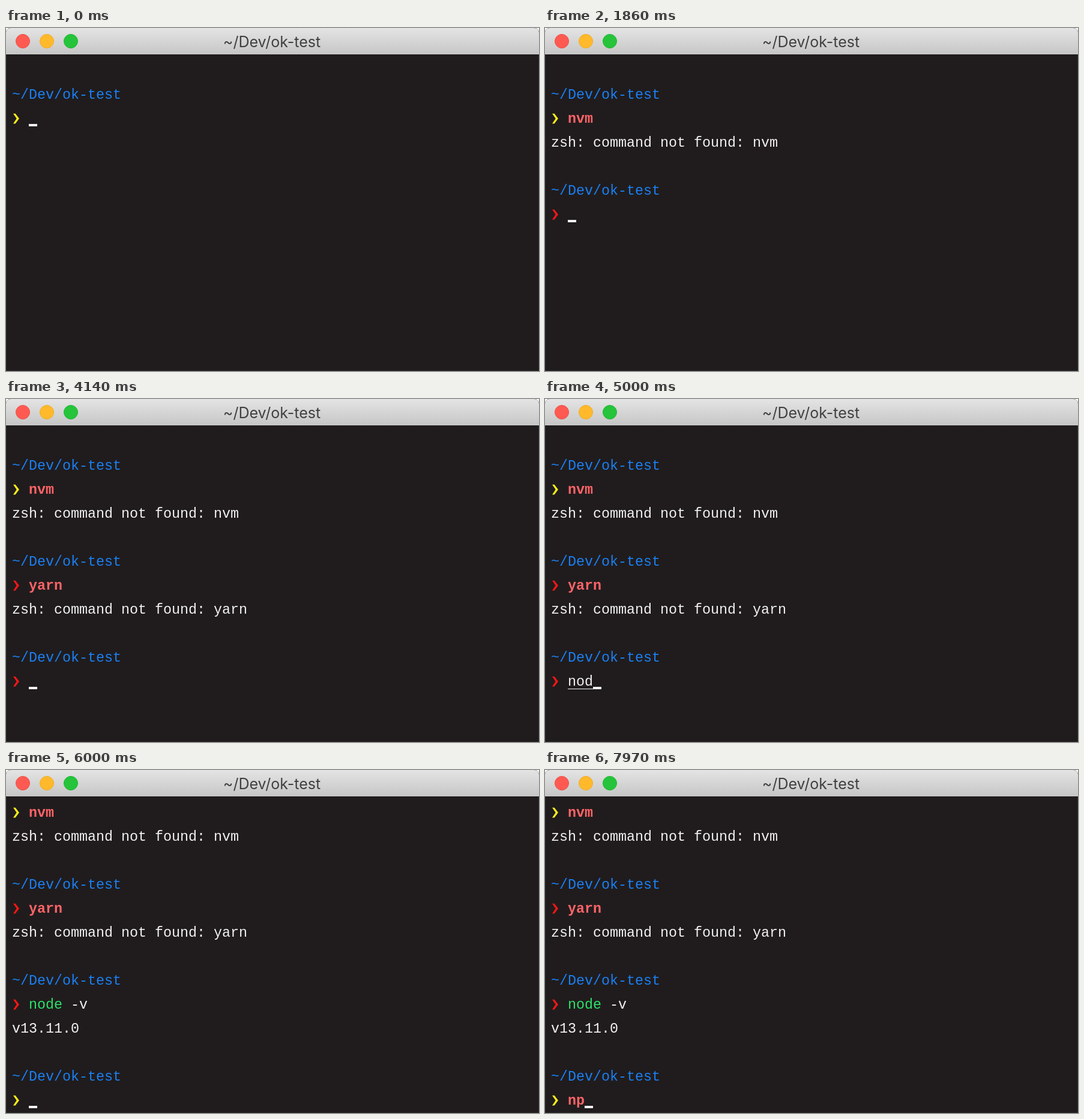
These frames come from a looping animation (888x572 px, 8 s). An HTML page with a canvas:

```html
<!DOCTYPE html>
<html lang="en">
<head>
<meta charset="utf-8">
<title>Terminal</title>
<style>
  html, body { margin: 0; width: 100%; height: 100%; overflow: hidden; background: #fff; }
  canvas { display: block; width: 888px; height: 572px; }
</style>
</head>
<body>
<canvas id="stage" width="888" height="572"></canvas>
<script>
const W = 888, H = 572, LOOP = 8000;
const CELL = 14, LINE = 40, LEFT = 10, FIRST_BASE = 78, MAX_ROWS = 13;
const MONO = '23.33px "Liberation Mono", monospace';
const COLOR = {
  bg: '#201c1d', text: '#f2f2f2', path: '#1a80f5', bad: '#ff6468',
  good: '#2be36a', ok: '#fff01a', fail: '#ff1616'
};
const FILES = ['node_modules', 'yarn.lock'];
const DIR = '~/Dev/ok-test';

// Each command: keystroke times, return key and end of output, in ms.
const SESSION = [
  { cmd: 'nvm', keys: [1180, 1320, 1450], enter: 1730, done: 1760,
    out: 'zsh: command not found: nvm', prompt: COLOR.ok },
  { cmd: 'yarn', keys: [2700, 2830, 2960, 3090], enter: 3440, done: 3470,
    out: 'zsh: command not found: yarn', prompt: COLOR.fail },
  { cmd: 'node -v', keys: [4690, 4820, 4950, 5070, 5210, 5360, 5490], enter: 5930, done: 5970,
    out: 'v13.11.0', prompt: COLOR.fail },
  { cmd: 'np', keys: [7760, 7890], enter: Infinity, done: Infinity, out: '', prompt: COLOR.ok }
];

const ctx = document.getElementById('stage').getContext('2d');

// Shell highlighting: known command, path prefix while editing, or unknown.
function highlight(word, editing) {
  if (word === 'node') return { color: COLOR.good };
  if (editing && FILES.some(f => f.startsWith(word))) return { color: COLOR.text, underline: true };
  return { color: COLOR.bad, bold: true };
}

function buildScreen(t) {
  const rows = [];
  let cursor = 0;
  for (const s of SESSION) {
    const typed = s.cmd.slice(0, s.keys.filter(k => k <= t).length);
    rows.push({}, { text: DIR, color: COLOR.path }, { prompt: s.prompt, typed, editing: t < s.enter });
    cursor = 2 + typed.length;
    if (t < s.enter) break;
    if (t < s.done) {
      rows.push({});
      cursor = 0;
      break;
    }
    rows.push({ text: s.out, color: COLOR.text });
  }
  return { rows, cursor };
}

function write(text, col, base, color, bold) {
  ctx.font = (bold ? 'bold ' : '') + MONO;
  ctx.fillStyle = color;
  [...text].forEach((ch, i) => ctx.fillText(ch, LEFT + (col + i) * CELL, base));
}

function chevron(base, color) {
  const points = [[12, -15.2], [15.6, -15.2], [21.9, -7], [15.6, 1.4], [12, 1.4], [17.7, -7]];
  ctx.fillStyle = color;
  ctx.beginPath();
  points.forEach(([x, y]) => ctx.lineTo(x, base + y));
  ctx.fill();
}

function drawCommand(row, base) {
  chevron(base, row.prompt);
  if (!row.typed) return;
  const word = row.typed.split(' ')[0];
  const look = highlight(word, row.editing);
  write(word, 2, base, look.color, look.bold);
  write(row.typed.slice(word.length), 2 + word.length, base, COLOR.text);
  if (look.underline) {
    // The line leaves a gap for the tail of a leading y.
    const skip = word[0] === 'y' ? 9 : 0;
    ctx.fillRect(LEFT + 2 * CELL + skip, base + 5, word.length * CELL - skip, 1);
  }
}

function drawWindow() {
  ctx.fillStyle = COLOR.bg;
  ctx.fillRect(0, 0, W, H);
  ctx.strokeStyle = '#2b2829';
  ctx.lineWidth = 2;
  ctx.strokeRect(0, 0, W, H);

  const bar = ctx.createLinearGradient(0, 0, 0, 44);
  bar.addColorStop(0, '#e4e4e4');
  bar.addColorStop(1, '#c6c6c6');
  ctx.fillStyle = bar;
  ctx.fillRect(0, 0, W, 44);

  const lights = [['#ff5a52', '#ec5049'], ['#ffb92b', '#eead28'], ['#25c43a', '#20b734']];
  lights.forEach(([fill, edge], i) => {
    ctx.beginPath();
    ctx.arc(28 + i * 40, 22, 11.5, 0, Math.PI * 2);
    ctx.fillStyle = fill;
    ctx.fill();
    ctx.strokeStyle = edge;
    ctx.lineWidth = 1;
    ctx.stroke();
  });

  ctx.font = '25px Inter, sans-serif';
  ctx.textAlign = 'center';
  ctx.fillStyle = '#404040';
  ctx.fillText(DIR, 443, 32);
  ctx.textAlign = 'left';
}

function draw(t) {
  ctx.fillStyle = '#fff';
  ctx.fillRect(0, 0, W, H);
  ctx.save();
  ctx.beginPath();
  ctx.roundRect(0, 0, W, H, [8, 8, 0, 0]);
  ctx.clip();
  drawWindow();

  const { rows, cursor } = buildScreen(t);
  const visible = rows.slice(-MAX_ROWS);
  visible.forEach((row, i) => {
    const base = FIRST_BASE + i * LINE;
    if (row.prompt) drawCommand(row, base);
    else if (row.text) write(row.text, 0, base, row.color);
  });
  ctx.fillStyle = COLOR.text;
  ctx.fillRect(LEFT + cursor * CELL, FIRST_BASE + (visible.length - 1) * LINE + 2, CELL, 4);
  ctx.restore();
}

const start = performance.now();
function tick() {
  draw((performance.now() - start) % LOOP);
  requestAnimationFrame(tick);
}
tick();
</script>
</body>
</html>
```
